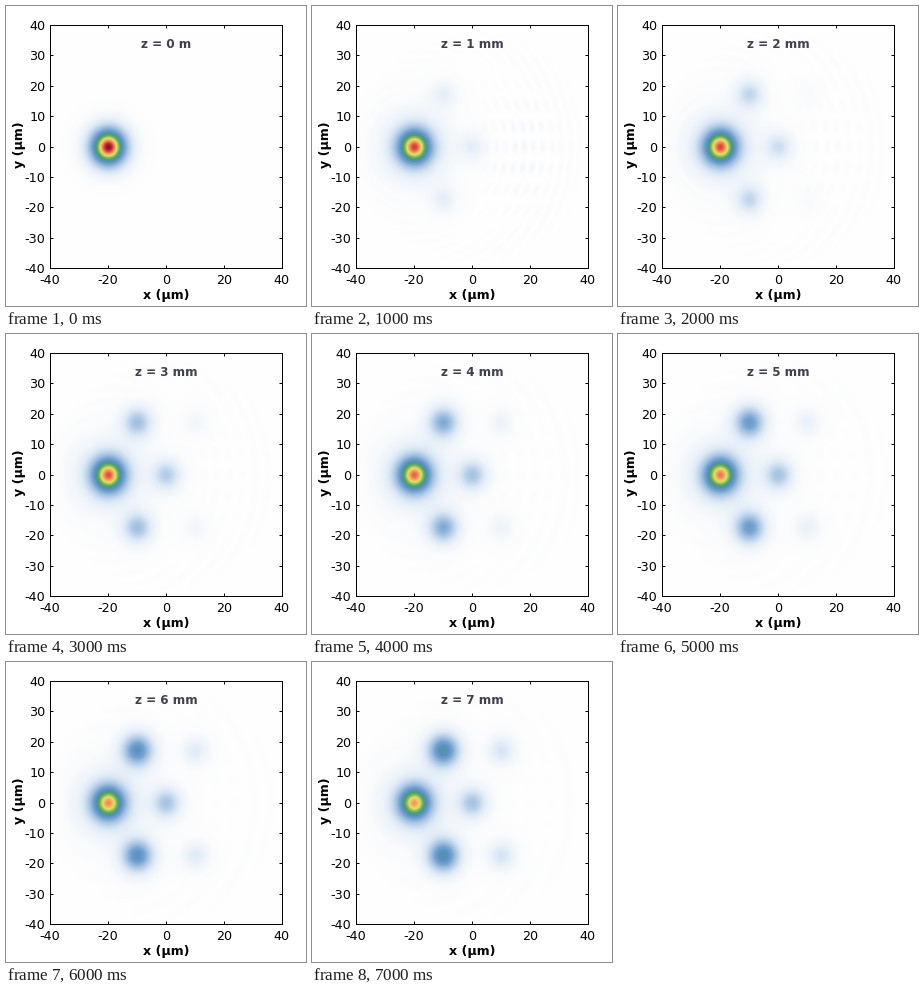
Animation of 300 by 300 pixels, one loop 8 s. Source, as a matplotlib script:

```python
import numpy as np
import matplotlib.pyplot as plt
from matplotlib.animation import FuncAnimation
from matplotlib.colors import LinearSegmentedColormap

SIZE = 300
LEFT, TOP, WIDTH, HEIGHT = 44, 19, 232, 243
PT = 0.72  # points per pixel at 100 dpi

STOPS = [(0, "#fefefe"), (0.05, "#deeaf6"), (0.10, "#b8d0e9"), (0.20, "#78a5d2"),
         (0.29, "#5a90c3"), (0.35, "#4f95a0"), (0.41, "#4ba55f"), (0.51, "#8cc052"),
         (0.61, "#e6de68"), (0.70, "#f5b45f"), (0.77, "#f08c55"), (0.86, "#e14b41"),
         (1, "#8c0a2d")]
CMAP = LinearSegmentedColormap.from_list("beam", STOPS, N=1024)

# Peak intensity in each group of cores against z in mm
Z = [0, 1, 3, 4, 5, 7]
LAUNCH = [1, 0.86, 0.83, 0.80, 0.77, 0.71]
NEAR = [0, 0.035, 0.135, 0.185, 0.235, 0.335]
CENTRE = [0, 0.035, 0.105, 0.125, 0.125, 0.125]
FAR = [0, 0, 0.018, 0.025, 0.032, 0.06]

x = -40 + 80 * np.arange(WIDTH) / WIDTH
y = 40 - 80 * np.arange(HEIGHT) / HEIGHT
X, Y = np.meshgrid(x, y)


def spot(cx, cy, width):
    return np.cosh(np.hypot(X - cx, Y - cy) / width) ** -2


def radiation(z):
    """Faint light that is not guided: a haze and interference rings."""
    if z == 0:
        return 0
    r = np.hypot(X + 20, Y)
    haze = np.exp(-(r / 13) ** 2)
    fringes = 0.5 + 0.5 * np.cos(2 * np.pi * r / (2.6 + 0.6 * z) + z)
    lobes = 0.5 + 0.5 * np.cos(Y * 0.9)
    cloud = np.exp(-((X - 18) / 13) ** 2 - (Y / 20) ** 2)
    rim = np.exp(-((np.hypot(X, Y) - 34) / 4) ** 2)
    return 0.03 * haze + 0.016 / z * cloud * fringes * lobes + 0.003 * rim * fringes


def intensity(z):
    launch, near, centre, far = (np.interp(z, Z, p) for p in (LAUNCH, NEAR, CENTRE, FAR))
    total = launch * spot(-20, 0, 4.0) + centre * spot(0, 0, 4.0)
    for side in (-17.3, 17.3):
        total += near * spot(-10, side, 4.0) + far * spot(10, side, 4.0)
    return total + radiation(z)


plt.rcParams["font.family"] = "DejaVu Sans"
fig = plt.figure(figsize=(3, 3), dpi=100, facecolor="white")
ax = fig.add_axes([LEFT / SIZE, 1 - (TOP + HEIGHT) / SIZE, WIDTH / SIZE, HEIGHT / SIZE])
image = ax.imshow(intensity(0), cmap=CMAP, vmin=0, vmax=1, extent=(-40, 40, -40, 40),
                  aspect="auto", interpolation="nearest")

xticks, yticks = range(-40, 41, 20), range(-40, 41, 10)
ax.set_xticks(xticks, [str(t) for t in xticks])
ax.set_yticks(yticks, [str(t) for t in yticks])
ax.tick_params(direction="in", length=3 * PT, width=PT, top=True, right=True,
               labelsize=12.8 * PT)
ax.tick_params(axis="x", pad=5.5 * PT)
ax.tick_params(axis="y", pad=4.5 * PT)
for spine in ax.spines.values():
    spine.set_linewidth(PT)


def bold(px, py, text, size=12.6, **style):
    return fig.text(px / SIZE, 1 - py / SIZE, text, ha="center", va="center",
                    fontsize=size * PT, weight="bold", **style)


bold(160, 290, "x (µm)")
bold(13.5, 138.5, "y (µm)", rotation=90)
title = bold(160, 38, "", 12, color="#404050")


def draw(z):
    image.set_data(intensity(z))
    title.set_text("z = 0 m" if z == 0 else f"z = {z} mm")
    return image, title


anim = FuncAnimation(fig, draw, frames=8, interval=1000, repeat=True, repeat_delay=0)
plt.show()
```
